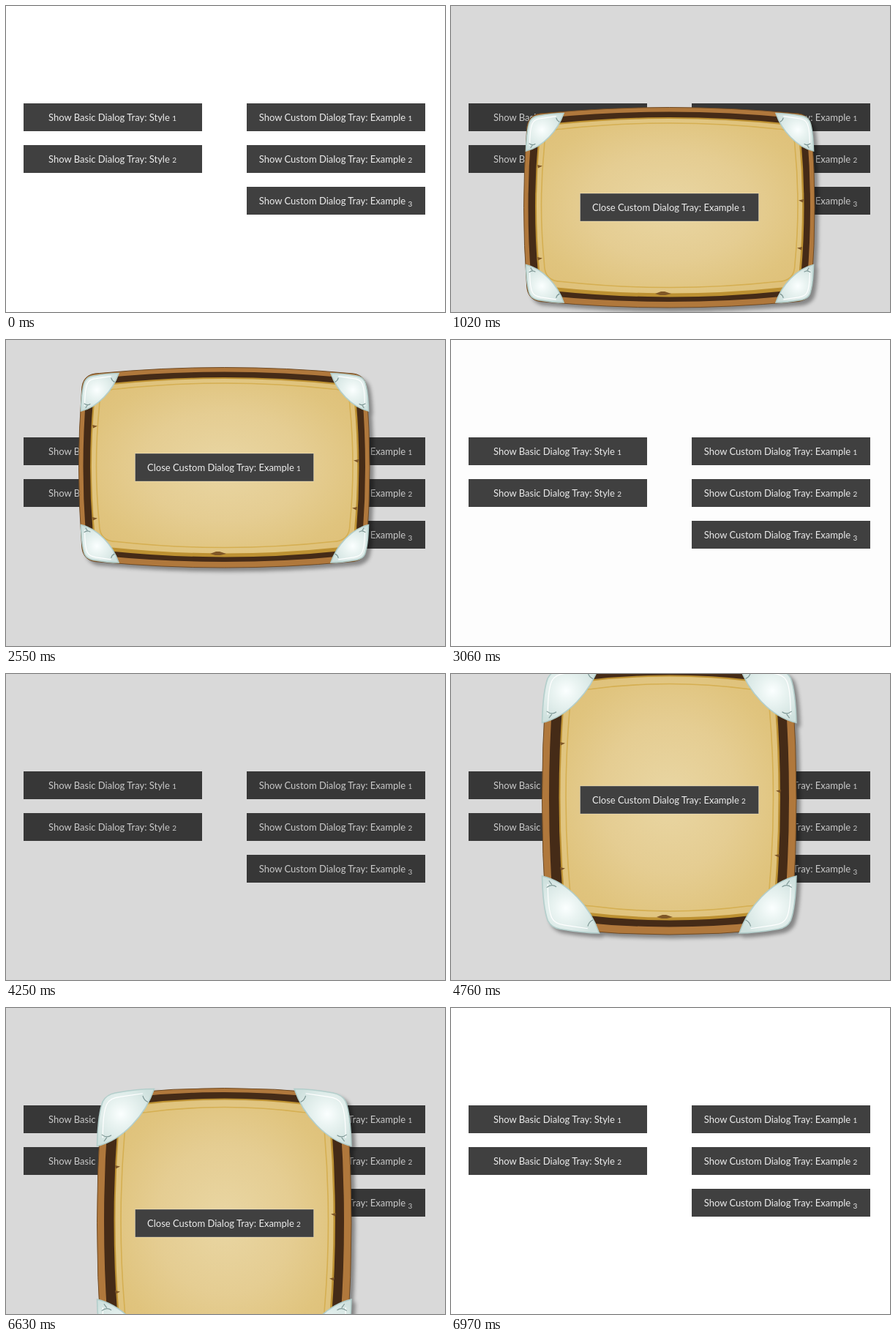
Animation of 600x418 px, one loop 7990 ms. Source, as an HTML page:

```html
<!DOCTYPE html>
<html lang="en">
<head>
<meta charset="utf-8">
<title>Dialog trays</title>
<style>
  html, body { margin: 0; width: 100%; height: 100%; overflow: hidden; background: #fff; }
  svg { display: block; width: 600px; height: 418px; }
  text { font: 400 13px Lato, "Open Sans", sans-serif; fill: #ececec; text-anchor: middle; }
  .digit { font-size: 10px; }
  .box { fill: #404040; }
  .hover .box { fill: #808080; }
  .close .box { stroke: #fff; stroke-opacity: .3; }
  .rest .close .box { stroke-opacity: .85; }
  .tray { filter: drop-shadow(5px 5px 2.5px rgba(0, 0, 0, .38)); }
  .rim { fill: #b0783c; stroke: #6f4a24; }
  .band { fill: #452b17; }
  .edge { fill: #bd9132; }
  .groove { fill: none; stroke: #d5af52; stroke-width: 1.6; }
  .knot { fill: #7f5726; }
  .corner path { vector-effect: non-scaling-stroke; }
  .metal { fill: url(#silver); stroke: #b3cecb; stroke-width: 1.6; }
  .shine { fill: none; stroke: #fff; stroke-width: 1.2; }
  .crack { fill: none; stroke: #7f9896; stroke-width: 1.2; }
</style>
</head>
<body>
<svg id="stage" viewBox="0 0 600 418">
  <defs>
    <radialGradient id="wood" r=".62">
      <stop offset="0" stop-color="#e9d6a3"/>
      <stop offset=".5" stop-color="#e5cd92"/>
      <stop offset=".85" stop-color="#e0c47e"/>
      <stop offset="1" stop-color="#dfc17a"/>
    </radialGradient>
    <radialGradient id="silver" cx=".42" cy=".44" r=".6">
      <stop offset="0" stop-color="#fbffff"/>
      <stop offset=".35" stop-color="#eaf4f2"/>
      <stop offset="1" stop-color="#cfe1de"/>
    </radialGradient>
    <g id="corner" class="corner">
      <path class="metal" d="M0 1C.01 .65 .05 .35 .1 .22Q.16 .1 .32 .07C.55 .03 .8 0 1 0C.85 .45 .45 .9 0 1Z"/>
      <path class="shine" d="M.1 .86C.1 .6 .11 .4 .17 .27Q.22 .16 .4 .14L.8 .08"/>
      <path class="crack" d="M.08 .8Q.17 .87 .25 .81M.17 .85L.12 .92M.8 .12Q.82 .2 .89 .23"/>
    </g>
  </defs>
</svg>
<script>
const stage = document.getElementById('stage');
const LOOP = 7990;

function add(parent, tag, attrs = {}, content = '') {
  const node = document.createElementNS('http://www.w3.org/2000/svg', tag);
  for (const key in attrs) node.setAttribute(key, attrs[key]);
  node.textContent = content;
  return parent.appendChild(node);
}

function addButton(parent, x, y, label, number, cls = '') {
  const group = add(parent, 'g', { class: cls });
  add(group, 'rect', { class: 'box', x, y, width: 244, height: 38 });
  const text = add(group, 'text', { x: x + 121.5, y: y + 24 }, label + ' ');
  add(text, 'tspan', { class: 'digit', dy: number === 3 ? 2.5 : 0 }, number);
  return group;
}

// Rounded rectangle whose sides bow outwards to touch the given bounds.
function bowed([left, top, right, bottom], bx, by, r) {
  const x0 = left + bx, x1 = right - bx, y0 = top + by, y1 = bottom - by;
  const mx = (left + right) / 2, my = (top + bottom) / 2;
  return `M${x0 + r} ${y0}Q${mx} ${top - by} ${x1 - r} ${y0}Q${x1} ${y0} ${x1} ${y0 + r}` +
    `Q${right + bx} ${my} ${x1} ${y1 - r}Q${x1} ${y1} ${x1 - r} ${y1}` +
    `Q${mx} ${bottom + by} ${x0 + r} ${y1}Q${x0} ${y1} ${x0} ${y1 - r}` +
    `Q${left - bx} ${my} ${x0} ${y0 + r}Q${x0} ${y0} ${x0 + r} ${y0}Z`;
}

function addTray(spec, number) {
  const group = add(stage, 'g');
  const art = add(group, 'g', { class: 'tray' });
  const [bx, by] = spec.bow;
  for (const [cls, bounds] of Object.entries(spec.layers)) {
    const shape = add(art, 'path', { class: cls, d: bowed(bounds, bx, by, spec.radius) });
    if (cls === 'panel') shape.setAttribute('fill', 'url(#wood)');
  }
  for (const [x, y, dir] of spec.knots)
    add(art, 'path', { class: 'knot', d: `M${x} ${y - 2}l${7 * dir} 1.5l${-6 * dir} 3Z` });
  const [kx, ky] = spec.notch;
  add(art, 'path', { class: 'knot', d: `M${kx - 11} ${ky}l8 -3h5l9 3l-8 2h-7Z` });

  const [left, top, right, bottom] = spec.corners;
  const s = spec.size;
  for (const [x, sx] of [[left, s], [right, -s]])
    for (const [y, sy] of [[top, s], [bottom, -s]])
      add(art, 'use', { href: '#corner', transform: `translate(${x} ${y}) scale(${sx} ${sy})` });

  const button = addButton(group, 176.5, 190, 'Close Custom Dialog Tray: Example', number, 'close');
  return { group, button };
}

for (const n of [1, 2]) addButton(stage, 24, 76 + 57 * n, 'Show Basic Dialog Tray: Style', n);
const openers = [1, 2, 3].map(n =>
  addButton(stage, 329, 76 + 57 * n, 'Show Custom Dialog Tray: Example', n));
const shade = add(stage, 'rect', { width: 600, height: 418 });

const trays = [
  addTray({
    bow: [4, 8], radius: 24, size: 51.5,
    layers: {
      rim: [99.5, 72.5, 497, 346],
      band: [105.5, 78.5, 491, 338],
      edge: [115, 86, 482.5, 331.5],
      panel: [117, 88, 480, 326.5],
      groove: [123.5, 94, 474, 318.5]
    },
    corners: [102.5, 80.5, 495.5, 339],
    knots: [[118, 153, 1], [118, 279, 1], [482, 200, -1], [480, 265, -1]],
    notch: [290, 327]
  }, 1),
  addTray({
    bow: [5, 7], radius: 30, size: 78,
    layers: {
      rim: [124.5, 24.5, 472, 393],
      band: [134, 30, 462, 382.5],
      edge: [147.5, 38.5, 450, 373.5],
      panel: [149.5, 40.5, 447.5, 369.5],
      groove: [157, 50.5, 440.5, 361]
    },
    corners: [124.5, 25.5, 472, 391],
    knots: [[149, 132, 1], [149, 303, 1], [451, 197, -1], [449, 285, -1]],
    notch: [292, 369]
  }, 2)
];

// Poses held from each time on: [ms, shade, tray, tray offset, hovered button].
const poses = [
  [0, 0],
  [680, .148],
  [850, .148, 0, 214],
  [1020, .148, 0, 66],
  [1190, .148, 0, -40],
  [1360, .148, 0, -2],
  [1530, .148, 0, 0],
  [2380, .148, 0, 0, trays[0].button],
  [2550, .148, 0, -35],
  [2720, .148, 0, -26],
  [2890, .148, 0, 81],
  [3060, .008],
  [4080, .008, -1, 0, openers[1]],
  [4250, .148],
  [4590, .148, 1, 88],
  [4760, .148, 1, -37],
  [4930, .148, 1, -35],
  [5100, .148, 1, 0],
  [6120, .148, 1, 0, trays[1].button],
  [6290, .148, 1, -10, trays[1].button],
  [6460, .148, 1, -36],
  [6630, .148, 1, 85],
  [6800, 0]
];

function draw(now) {
  const time = now % LOOP;
  const [, dim, active = -1, offset = 0, hovered] = poses.findLast(pose => pose[0] <= time);
  shade.setAttribute('fill-opacity', dim);
  trays.forEach(({ group }, i) => {
    group.setAttribute('visibility', i === active ? 'visible' : 'hidden');
    group.setAttribute('transform', `translate(0 ${offset})`);
    group.classList.toggle('rest', offset === 0);
  });
  for (const button of [openers[1], ...trays.map(tray => tray.button)])
    button.classList.toggle('hover', button === hovered);
}

const start = performance.now();
function tick() {
  draw(performance.now() - start);
  requestAnimationFrame(tick);
}
tick();
</script>
</body>
</html>
```
